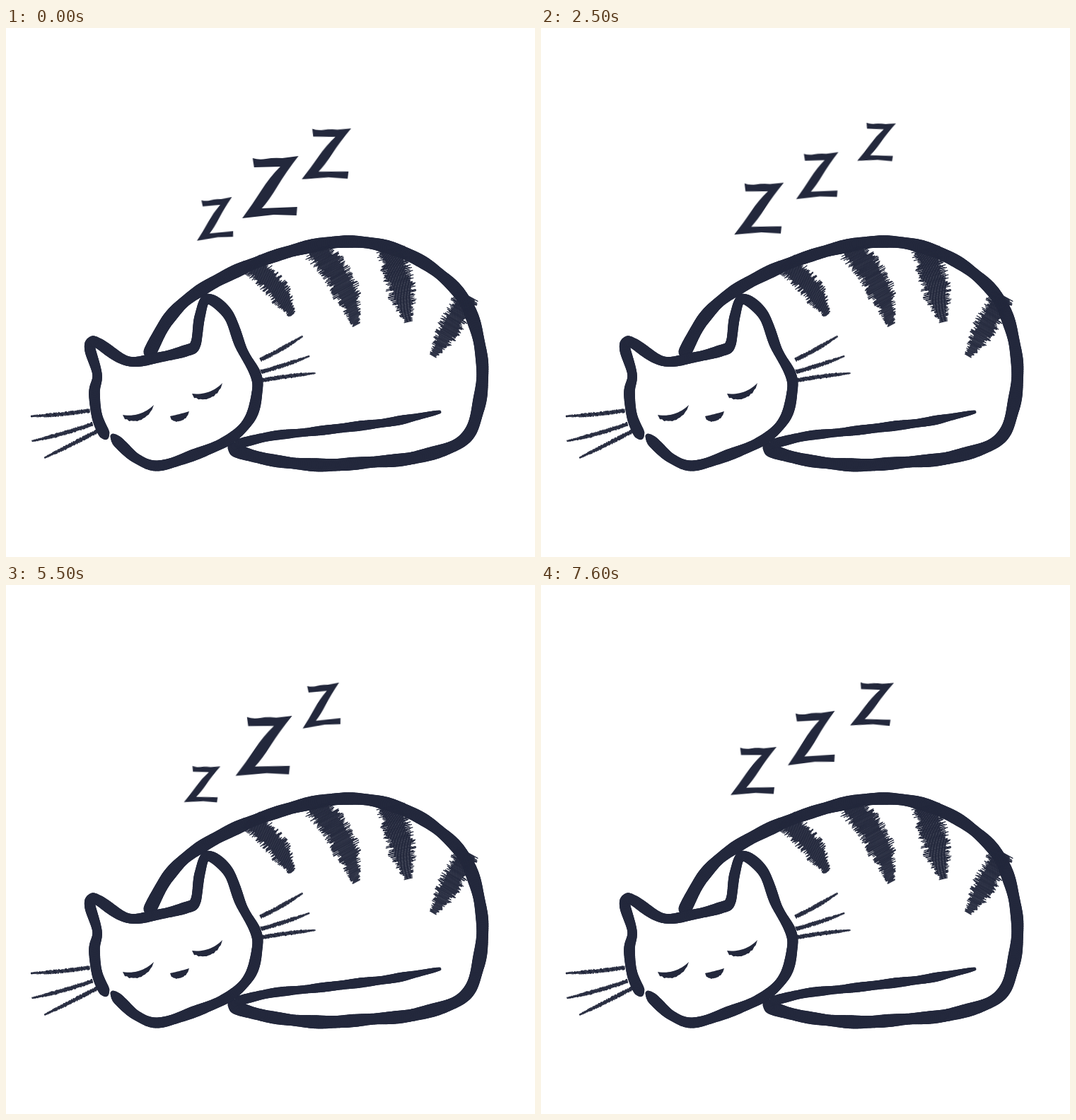
Write an HTML page with a canvas that moves like this. It is 748 px wide and 748 px high and loops after 8000 ms.

```html
<!DOCTYPE html>
<html lang="en">
<head>
<meta charset="utf-8">
<title>Sleeping cat</title>
<style>
html, body { margin: 0; width: 100%; height: 100%; overflow: hidden; background: #fff; }
canvas, svg { position: absolute; left: 0; top: 0; width: 748px; height: 748px; }
svg { fill: #23283c; }
use { animation: drift 8s infinite; }

#low {
  --rise: translate(255.2px, 293.5px) rotate(2.6deg) scale(.557);
  --grow: translate(277.3px, 281.8px) rotate(3.5deg) scale(.608);
  --top: translate(294.7px, 270px) rotate(-3.5deg) scale(.669);
  --sink: translate(300.5px, 263px) rotate(1.6deg) scale(.793);
  --out: translate(316px, 248px) rotate(1.4deg) scale(.92);
}
#mid {
  --rise: translate(351px, 228.7px) rotate(2deg) scale(.969);
  --grow: translate(364.5px, 227.5px) rotate(1.2deg) scale(.984);
  --top: translate(373.7px, 225px) rotate(0deg) scale(1);
  --sink: translate(382.2px, 216.5px) rotate(-1.3deg) scale(.858);
  --out: translate(399px, 201px) rotate(1deg) scale(.647);
}
#high {
  --rise: translate(438px, 171px) rotate(-2deg) scale(.628);
  --grow: translate(445.2px, 170.5px) rotate(-3.7deg) scale(.699);
  --top: translate(453px, 178px) rotate(2.1deg) scale(.847);
  --sink: translate(468px, 168.5px) rotate(3.8deg) scale(.727);
  --out: translate(481px, 154px) rotate(4deg) scale(.555);
}
/* every step lasts 500 ms */
@keyframes drift {
  0%, 75% { transform: var(--top); opacity: 1; animation-timing-function: steps(3); }
  18.75%, 93.75%, 100% { transform: var(--sink); opacity: 1; animation-timing-function: steps(4); }
  43.75% { transform: var(--out); opacity: 1; animation-timing-function: step-end; }
  50% { transform: var(--rise); opacity: 0; animation-timing-function: step-end; }
  56.25% { transform: var(--rise); opacity: 1; animation-timing-function: steps(2); }
  68.75% { transform: var(--grow); opacity: 1; animation-timing-function: step-end; }
}
</style>
</head>
<body>
<canvas id="cat" width="748" height="748"></canvas>
<svg viewBox="0 0 748 748">
  <defs>
    <path id="zed" d="M-25-41Q-16-38 -6-40T17-41L39.800-44Q22-21 10-1T-12 30L38 28 37 40 5 39-39.700 44Q-25 24 -13 5T14-29L-23-28Z"/>
  </defs>
  <use id="low" href="#zed"/>
  <use id="mid" href="#zed"/>
  <use id="high" href="#zed"/>
</svg>
<script>
const ctx = document.getElementById('cat').getContext('2d');
ctx.fillStyle = ctx.strokeStyle = '#23283c';
ctx.lineCap = 'round';

let seed = 7;
const rnd = () => (seed = (seed * 16807) % 2147483647) / 2147483647;

function line(x0, y0, x1, y1, width) {
  ctx.lineWidth = width;
  ctx.beginPath();
  ctx.moveTo(x0, y0);
  ctx.lineTo(x1, y1);
  ctx.stroke();
}

// Catmull-Rom curve through the points
function spline(text, gap = 3) {
  const pts = text.trim().split(/\s+/).map(p => p.split(',').map(Number));
  const at = i => pts[Math.min(Math.max(i, 0), pts.length - 1)];
  const out = [];
  for (let i = 0; i < pts.length - 1; i++) {
    const [a, b, c, d] = [at(i - 1), at(i), at(i + 1), at(i + 2)];
    const n = Math.ceil(Math.hypot(c[0] - b[0], c[1] - b[1]) / gap);
    for (let k = 0; k < n; k++) {
      const t = k / n;
      out.push(b.map((v, j) => v + t / 2 * (c[j] - a[j] +
        t * (2 * a[j] - 5 * v + 4 * c[j] - d[j] + t * (3 * (v - c[j]) + d[j] - a[j])))));
    }
  }
  return [...out, at(pts.length)];
}

// Ink stroke with a slightly uneven width; head and tail are taper lengths
function brush(text, width, head, tail) {
  const pts = spline(text);
  for (let i = 1; i < pts.length; i++) {
    const taper = Math.min(1, .4 + i * 3 / head, .3 + (pts.length - i) * 3 / tail);
    const uneven = 1 + .05 * Math.sin(i / 3) + .05 * Math.sin(i / 7);
    line(...pts[i - 1], ...pts[i], width * taper * uneven);
  }
}

const quad = (a, b, c, t) => a * (1 - t) ** 2 + 2 * b * t * (1 - t) + c * t * t;

// Row of hairs across a curve, shorter towards its end
function hairs(x0, y0, cx, cy, x1, y1, width) {
  const len = Math.hypot(x1 - x0, y1 - y0);
  const nx = (y1 - y0) / len, ny = (x0 - x1) / len;
  for (let d = 0; d < len; d += .9) {
    const t = d / len;
    const x = quad(x0, cx, x1, t), y = quad(y0, cy, y1, t);
    const half = width / 2 * Math.min(1, .3 + 2 * (1 - t));
    const a = half * (.55 + .6 * rnd()), b = half * (.55 + .6 * rnd());
    line(x - nx * a, y - ny * a, x + nx * b, y + ny * b, 1.3);
  }
}

// Curved lid with a ragged lower edge
function crescent(x0, y0, cx, cy, x1, y1, depth) {
  const n = 16;
  ctx.beginPath();
  for (let i = 0; i <= n; i++) ctx.lineTo(quad(x0, cx, x1, i / n), quad(y0, cy, y1, i / n));
  for (let i = n; i >= 0; i--) {
    const t = i / n, drop = depth * Math.sqrt(Math.sin(Math.PI * t) + 1e-9) + (i % 2) * 2 * rnd();
    ctx.lineTo(quad(x0, cx, x1, t), quad(y0, cy, y1, t) + drop);
  }
  ctx.fill();
}

// Back, belly and tail
brush(`202,461 230,411 270,374 343,336 424,310 490,302 550,313 607,343 652,392 673,470
  667,540 645,584 580,607 515,614 445,618 375,611 322,596 330,588`, 17.5, 15, 30);
brush('328,588 375,577 430,571 505,562 550,556 613,543', 13, 10, 80);

// Head
brush(`141,578 129,550 125,515 129,490 119,455 121,444 131,446 172,471 215,466 255,456
  268,447 274,408 285,383 314,405 333,453 353,490 355,515 345,552 315,582 262,605
  215,619 185,609 163,590 151,577`, 15, 20, 20);

// Coat stripes
hairs(345, 332, 383, 360, 405, 406, 31);
hairs(439, 314, 482, 350, 495, 420, 37);
hairs(544, 313, 557, 355, 569, 416, 38);
hairs(652, 378, 634, 415, 604, 464, 32);

// Whiskers, three on each cheek
hairs(118, 541, 78, 547, 35, 549, 5);
hairs(122, 560, 80, 575, 37, 584, 5);
hairs(131, 569, 95, 588, 54, 608, 5);
hairs(360, 469, 388, 456, 419, 436, 5);
hairs(361, 486, 392, 478, 429, 464, 5);
hairs(362, 498, 398, 492, 437, 488, 5);

// Eyes and nose
crescent(165, 547, 190, 551, 209, 533, 9);
crescent(263, 517, 288, 520, 306, 502, 9);
crescent(232, 549, 246, 546, 259, 542, 10);
</script>
</body>
</html>
```
